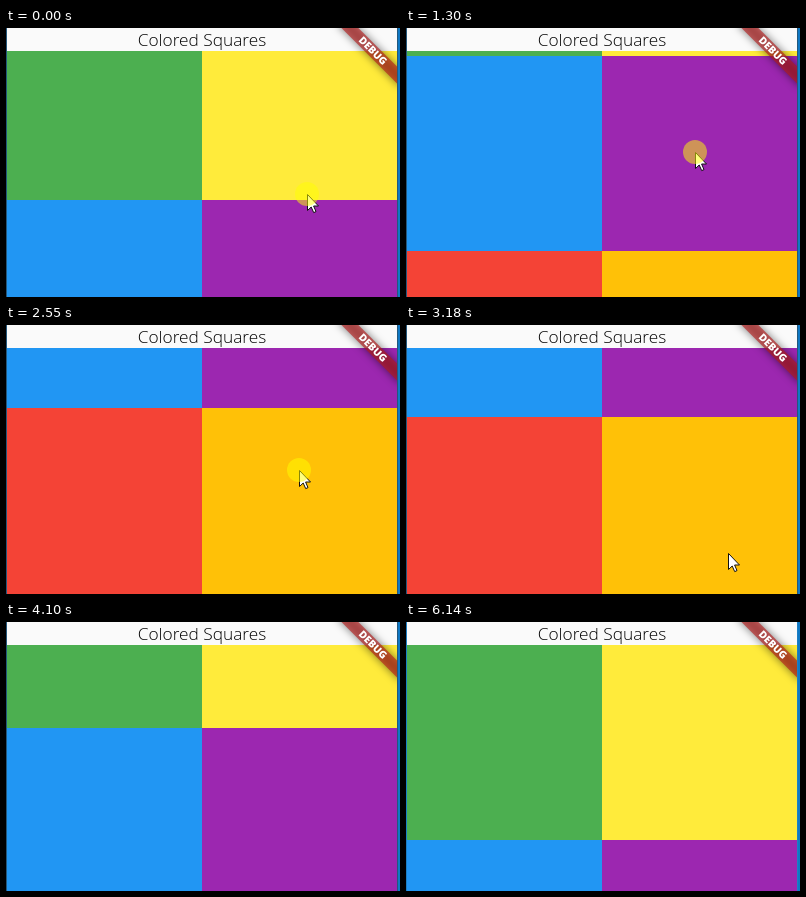
Recreate the animation shown at these times as an HTML page with a canvas. Size 394x269 px, loop 6230 ms.

```html
<!DOCTYPE html>
<html lang="en">
<head>
<meta charset="utf-8">
<title>Colored Squares</title>
<style>
  html, body { margin: 0; width: 100%; height: 100%; overflow: hidden; }
  canvas { display: block; width: 394px; height: 269px; }
</style>
</head>
<body>
<canvas id="stage" width="394" height="269"></canvas>
<script>
const ctx = document.getElementById('stage').getContext('2d');
const W = 394, H = 269, LOOP = 6230, REFRESH = 77.7;
const LEFT = 1, RIGHT = 391, BAR = 23, CELL = 195;
const MAX_SCROLL = 321, HOLD = 80;
const POINTER_GONE = 5270, WINDOW_BLUR = 6120;

const ROWS = [
  ['#4caf50', '#ffeb3b'],
  ['#2196f3', '#9c27b0'],
  ['#f44336', '#ffc107'],
];

// Each gesture moves the pointer between two points; all but hovers drag the list.
const GESTURES = [
  { start: -175, end: 80, from: [313, 212], to: [295, 145] },
  { start: 610, end: 1000, from: [295, 212], to: [296, 177] },
  { start: 1150, end: 1300, from: [296, 212], to: [289, 124] },
  { start: 1600, end: 1930, from: [289, 208], to: [287, 103] },
  { start: 2400, end: 2640, from: [289, 190], to: [296, 120] },
  { start: 3000, end: 3180, from: [320, 240], to: [322, 228], hover: true },
  { start: 3430, end: 4100, from: [325, 90], to: [333, 299] },
  { start: 4660, end: 4960, from: [317, 107], to: [325, 219] },
];

const clamp = (v, lo, hi) => Math.min(hi, Math.max(lo, v));
const smooth = p => p * p * (3 - 2 * p);
const mix = (a, b, p) => a.map((v, i) => v + (b[i] - v) * p);
const progress = (t, start, end) => clamp((t - start) / (end - start), 0, 1);

function pointerAt(t) {
  const index = GESTURES.findLastIndex(g => g.start <= t);
  const now = GESTURES[index], next = GESTURES[index + 1];
  const free = now.end + HOLD;
  if (t < free || !next) return mix(now.from, now.to, progress(t, now.start, now.end));
  return mix(now.to, next.from, smooth(progress(t, free, next.start)));
}

const isPressed = t => GESTURES.some(g => !g.hover && t >= g.start && t < g.end + HOLD);

// Dragging past the end meets resistance and springs back after release.
function scrollAt(t) {
  let scroll = 0;
  for (const g of GESTURES) {
    if (g.hover || t < g.start) continue;
    const dragged = scroll + (g.from[1] - g.to[1]) * progress(t, g.start, g.end);
    const limit = clamp(dragged, 0, MAX_SCROLL);
    const spring = Math.exp(-Math.max(0, t - g.end) / 120);
    scroll = limit + (dragged - limit) * 0.45 * spring;
  }
  return scroll;
}

function fill(color, x, y, w, h) {
  ctx.fillStyle = color;
  ctx.fillRect(x, y, w, h);
}

function clipTo(x, y, w, h) {
  ctx.beginPath();
  ctx.rect(x, y, w, h);
  ctx.clip();
}

function label(text, font, color, x, y) {
  ctx.font = font;
  ctx.fillStyle = color;
  ctx.textAlign = 'center';
  ctx.fillText(text, x, y);
}

function drawSquares(scroll) {
  ctx.save();
  clipTo(LEFT, BAR, RIGHT - LEFT, H - BAR);
  ROWS.forEach((row, r) => row.forEach((color, c) =>
    fill(color, LEFT + c * CELL, Math.round(BAR + r * CELL - scroll), CELL, CELL)));
  ctx.restore();
}

function drawTitle() {
  fill('#fafafa', LEFT, 0, RIGHT - LEFT, BAR);
  label('Colored Squares', '360 17.3px "Open Sans", "Noto Sans", sans-serif', '#000', 196, 18);
}

function drawBanner() {
  ctx.save();
  clipTo(LEFT, 0, RIGHT - LEFT, H);
  ctx.translate(RIGHT, -1);
  ctx.rotate(Math.PI / 4);
  ctx.filter = 'blur(4px)';
  fill('rgba(0,0,0,0.5)', -44, 28, 88, 12);
  ctx.filter = 'none';
  fill('rgba(183,28,28,0.63)', -44, 28, 88, 12);
  label('DEBUG', '800 10.2px "Open Sans", sans-serif', '#fff', -0.3, 37.4);
  ctx.restore();
}

function drawPointer([x, y], pressed) {
  ctx.save();
  ctx.translate(Math.round(x), Math.round(y));
  const arrow = new Path2D('M.5 .5V16.5L4.2 13L6.7 18.6L9 17.6L6.6 12H11.5Z');
  ctx.fillStyle = '#fff';
  ctx.fill(arrow);
  ctx.strokeStyle = '#111';
  ctx.stroke(arrow);
  if (pressed) {
    ctx.beginPath();
    ctx.arc(0, 0, 12, 0, Math.PI * 2);
    ctx.fillStyle = 'rgba(255,255,0,0.5)';
    ctx.fill();
  }
  ctx.restore();
}

function render(time) {
  const tick = Math.floor((time % LOOP + 22) / REFRESH);
  const t = Math.max(0, tick * REFRESH - 10);

  fill('#0f78c4', 0, 0, W, H);
  const border = t < WINDOW_BLUR ? '#24587c' : '#1c7fc4';
  fill(border, 0, 0, 1, H);
  fill(border, RIGHT, 0, 1, H);

  drawTitle();
  drawSquares(scrollAt(t));
  drawBanner();
  if (t < POINTER_GONE) drawPointer(pointerAt(t), isPressed(t));
}

const begin = performance.now();
function frame() {
  render(performance.now() - begin);
  requestAnimationFrame(frame);
}
frame();
</script>
</body>
</html>
```
